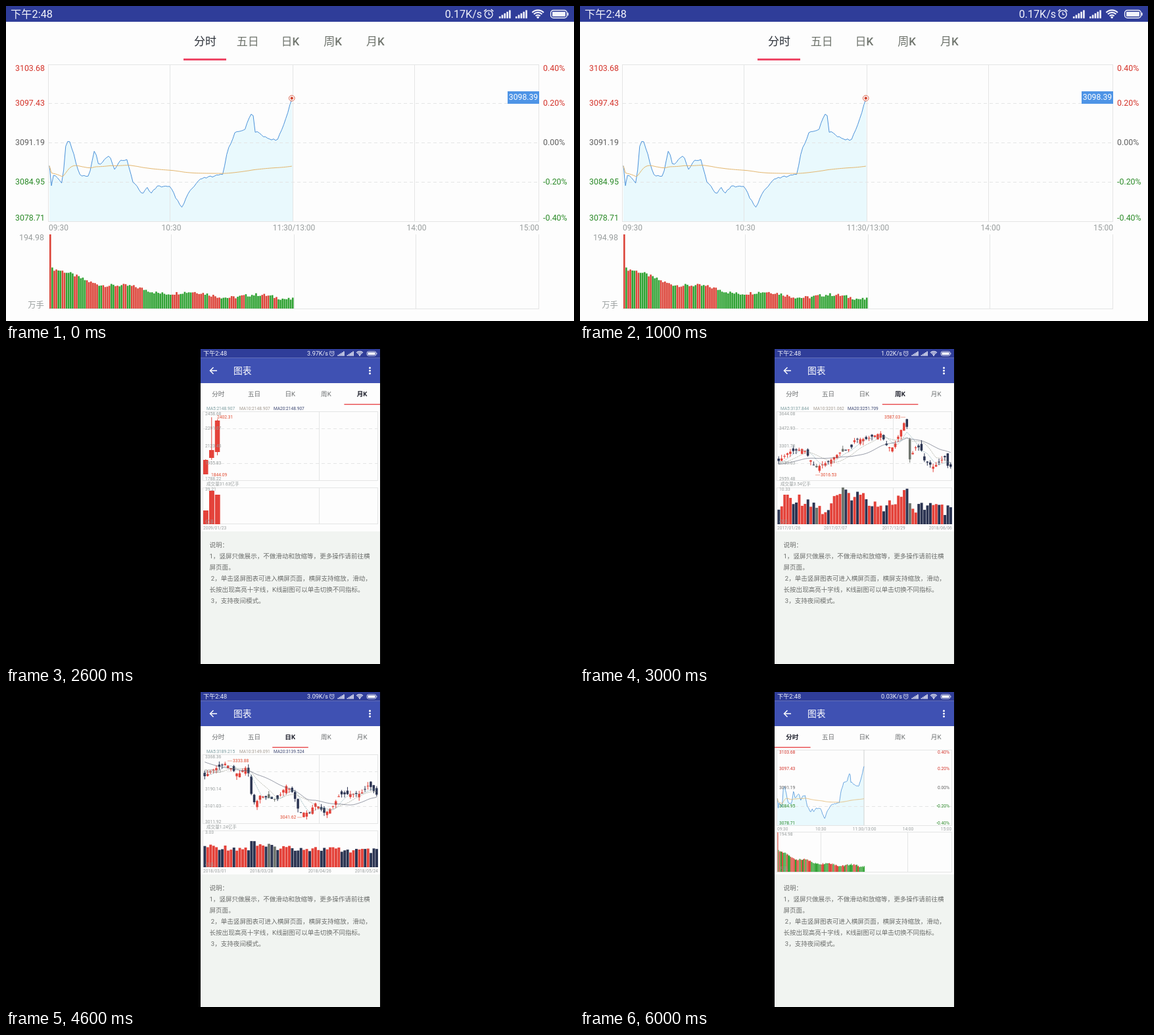
Write an HTML page with a canvas that moves like this. It is 864x480 px and loops after 7000 ms.

```html
<!DOCTYPE html>
<html lang="zh">
<head>
<meta charset="utf-8">
<style>
html, body { margin: 0; width: 100%; height: 100%; overflow: hidden; background: #000; }
canvas { display: block; }
</style>
</head>
<body>
<canvas id="stage" width="864" height="480"></canvas>
<script>
const ctx = document.getElementById('stage').getContext('2d');
const RED = '#dc4439', GREEN = '#2fa232', GRAY = '#999e9e', GRID = '#e4e5e5', DARK = '#2b3452';
const UP_TEXT = '#d4342b', FLAT_TEXT = '#606060', DOWN_TEXT = '#2b8a28';
const AXIS_COLORS = [UP_TEXT, UP_TEXT, FLAT_TEXT, DOWN_TEXT, DOWN_TEXT];
const TABS = ['分时', '五日', '日K', '周K', '月K'];

function noise(n) {
  const s = Math.sin(n * 12.9898) * 43758.5453;
  return s - Math.floor(s);
}

const jitter = (n, size) => (noise(n) - 0.5) * size;
const series = (count, rule) => Array.from({ length: count }, (_, i) => rule(i));

// Linear interpolation through key points written as 'x,y x,y ...'
function path(keys) {
  const points = keys.split(' ').map(p => p.split(',').map(Number));
  return x => {
    const next = points.findIndex(p => p[0] >= x);
    if (next < 1) return (next ? points[points.length - 1] : points[0])[1];
    const [x0, y0] = points[next - 1], [x1, y1] = points[next];
    return y0 + (y1 - y0) * (x - x0) / (x1 - x0);
  };
}

// One trading morning: a price and a volume per minute, in landscape pixels
const dayPath = path('66,245 69,273 73,256 86,271 91,212 96,202 112,257 126,260 135,217 141,244 158,227 ' +
  '165,250 175,234 184,234 193,267 208,287 214,276 220,287 230,274 250,276 267,309 278,284 297,263 330,257 ' +
  '337,220 349,192 363,188 375,160 379,191 397,201 413,205 424,177 435,140');
const minuteX = i => 66 + i * 3.1;
const dayPrice = series(120, i => dayPath(minuteX(i)) + jitter(i, 3));
const dayVolume = series(120, i => i ? 15 + 46 * Math.exp(-i / 38) + 3 * Math.sin(i / 5) + jitter(i, 5) : 113);
let turnover = 0, traded = 0;
const dayAverage = dayPrice.map((y, i) => (turnover += y * dayVolume[i]) / (traded += dayVolume[i]));

// Five sessions, one value per pixel
const fivePath = path('300,180 308,168 317,187 335,171 349,193 357,175 365,183 375,169 404,160 407,172 ' +
  '421,157 433,172 449,181 455,178 462,160 470,168 498,162 524,168 538,162');
const fivePrice = series(239, i => fivePath(300 + i) + jitter(i, 4));
let smooth = 178;
const fiveAverage = fivePrice.map(y => smooth += (y - smooth) * 0.035);
const openings = [[0, 60, 1], [2, 14, 9], [53, 44, 3], [106, 26, 5], [161, 13, 9], [213, 28, 4]];
const fiveVolume = series(240, i => openings.reduce(
  (h, [at, size, decay]) => h + (i < at ? 0 : size * Math.exp((at - i) / decay)),
  4 + noise(i) * 4 + (noise(i + 7) > 0.97 ? 9 : 0)));

const monthly = {
  tab: 4, averages: ['2148.907', '2148.907', '2148.907'],
  axis: ['2458.68', '2291.07', '2123.45', '1955.83', '1788.22'],
  dates: ['2009/01/23'], volume: '31.63', maxVolume: '39.21',
  high: ['2402.31', 321, 104], low: ['1844.09', 312, 192]
};
const weekly = {
  tab: 3, averages: ['3137.844', '3201.062', '3251.709'],
  axis: ['3644.08', '3472.93', '3301.78', '3130.63', '2959.48'],
  dates: ['2017/01/26', '2017/07/07', '2017/12/29', '2018/06/06'], volume: '3.54', maxVolume: '10.33',
  high: ['3587.03', 463, 104, 488, 495], low: ['3016.53', 366, 192, 358, 365], count: 60, volumeNoise: 20,
  close: path('296,176 318,157 340,152 358,181 378,172 395,158 412,152 418,138 436,137 457,128 468,150 ' +
    '477,150 495,108 498,122 500,172 510,150 518,150 524,170 538,180 557,163 560,182 566,178'),
  volumeTop: path('300,250 313,225 350,231 372,249 395,221 420,221 465,240 493,222 499,220 504,255 515,235 566,250')
};
const daily = {
  tab: 2, averages: ['3189.215', '3149.091', '3139.524'],
  axis: ['3368.36', '3279.25', '3190.14', '3101.03', '3011.92'],
  dates: ['2018/03/01', '2018/03/28', '2018/04/26', '2018/05/24'], volume: '1.24', maxVolume: '3.03',
  high: ['3333.88', 345, 105, 337, 344], low: ['3041.62', 417, 191, 443, 450], count: 60, volumeNoise: 9,
  close: path('240,92 300,130 314,119 334,109 353,126 365,115 371,129 372,152 379,172 386,158 412,165 ' +
    '426,143 437,154 446,184 462,184 470,169 485,185 496,176 508,156 540,155 552,141 565,158'),
  volumeTop: path('300,235 371,239 375,216 380,235 566,243')
};

function rect(x, y, w, h, color) {
  ctx.fillStyle = color;
  ctx.fillRect(x, y, w, h);
}

function text(s, x, y, size, color, align = 'left', weight = 400) {
  ctx.font = `${weight} ${size}px Roboto, "Noto Sans CJK SC", "Noto Sans CJK", sans-serif`;
  ctx.textAlign = align;
  ctx.textBaseline = 'middle';
  ctx.fillStyle = color;
  ctx.fillText(s, x, y);
}

function line(points, color, width = 1, dash = []) {
  ctx.beginPath();
  points.forEach(p => ctx.lineTo(...p));
  ctx.strokeStyle = color;
  ctx.lineWidth = width;
  ctx.setLineDash(dash);
  ctx.stroke();
  ctx.setLineDash([]);
}

function circle(x, y, r, fill, stroke, width = 1) {
  ctx.beginPath();
  ctx.arc(x, y, r, 0, 7);
  if (fill) { ctx.fillStyle = fill; ctx.fill(); }
  if (stroke) { ctx.strokeStyle = stroke; ctx.lineWidth = width; ctx.stroke(); }
}

function frame(x, y, w, h) {
  ctx.strokeStyle = GRID;
  ctx.lineWidth = 1;
  ctx.strokeRect(x, y, w, h);
}

const vertical = (x, y1, y2, color = GRID) => line([[x, y1], [x, y2]], color);
const dashed = (x1, x2, y) => line([[x1, y], [x2, y]], GRID, 1, [5, 4]);

function area(points, bottom, right) {
  ctx.beginPath();
  ctx.moveTo(points[0][0], bottom);
  points.forEach(p => ctx.lineTo(...p));
  ctx.lineTo(right, bottom);
  ctx.fillStyle = '#e9f9fd';
  ctx.fill();
}

function statusBar(left, right, scale, speed) {
  const white = '#f2f3fb', end = (right - left) / scale;
  ctx.save();
  ctx.translate(left, 0);
  ctx.scale(scale, scale);
  rect(0, 0, end, 13.6, '#2f3d99');
  text('下午2:48', 4, 7.2, 9.2, white);
  text(speed + 'K/s', end - 79, 7.2, 9.1, white, 'right');
  const clock = end - 73.3;
  circle(clock, 7.2, 3.3, null, white, 0.8);
  line([[clock, 5.3], [clock, 7.4], [clock + 1.5, 7.4]], white, 0.7);
  for (const side of [-1, 1]) line([[clock + side * 4, 4.6], [clock + side * 2, 2.9]], white, 0.8);
  for (const x of [end - 64.5, end - 50.3])
    for (let i = 0; i < 5; i++) rect(x + i * 2.15, 9 - i * 1.35, 1.5, 1.6 + i * 1.35, white);
  const wifi = end - 31;
  for (const r of [2.8, 5, 7]) {
    ctx.beginPath();
    ctx.arc(wifi, 10.6, r, -2.35, -0.79);
    ctx.lineWidth = 1.2;
    ctx.strokeStyle = white;
    ctx.stroke();
  }
  circle(wifi, 9.8, 1, white);
  ctx.beginPath();
  ctx.roundRect(end - 20, 3.7, 14, 6.6, 2.4);
  ctx.lineWidth = 0.8;
  ctx.stroke();
  rect(end - 18.6, 5, 11.2, 4, white);
  rect(end - 5.5, 5.8, 0.8, 2.4, white);
  ctx.restore();
}

// Shades the day's price area and returns a function that strokes its lines
function dayCurve(mapX, mapY, bottom, right, width) {
  const place = values => values.map((y, i) => [mapX(minuteX(i)), mapY(y)]);
  area(place(dayPrice), bottom, right);
  return () => {
    line(place(dayPrice), '#4b92da', width);
    line(place(dayAverage), '#e3b56b', width);
  };
}

function dayBars(mapX, bottom, scale, width) {
  dayVolume.forEach((h, i) => rect(mapX(minuteX(i)), bottom - h * scale, width, h * scale,
    !i || noise(i >> 1) > 0.5 ? RED : GREEN));
}

const dayAxis = ['3103.68', '3097.43', '3091.19', '3084.95', '3078.71'];
const dayPercent = ['0.40%', '0.20%', '0.00%', '-0.20%', '-0.40%'];
const fiveAxis = ['3215.04', '3167.75', '3120.46', '3073.17', '3025.88'];
const fivePercent = ['3.03%', '1.52%', '0.00%', '-1.52%', '-3.03%'];

// Labels spread over a width; the outer ones stay inside it
function spread(labels, left, step, y, size, last) {
  labels.forEach((s, i) => text(s, left + i * step, y, size, GRAY, !i ? 'left' : i === last ? 'right' : 'center'));
}

const hourLabels = (left, step, y, size) =>
  spread(['09:30', '10:30', '11:30/13:00', '14:00', '15:00'], left, step, y, size, 4);

function landscape() {
  rect(0, 0, 864, 480, '#fdfdfd');
  statusBar(0, 864, 1.77, '0.17');
  TABS.forEach((s, i) => text(s, 303 + i * 64.7, 54.5, 17, i ? '#70756e' : '#2b3038', 'center', 500));
  rect(270, 80, 65, 3, '#ee4766');

  const drawCurve = dayCurve(x => x, y => y, 329, 437, 1);
  frame(64.5, 89.5, 746, 239);
  [249.5, 436.5, 621.5].forEach(x => vertical(x, 90, 329));
  [148.5, 208.5, 268.5].forEach(y => dashed(65, 811, y));
  drawCurve();
  circle(434.8, 140.5, 4.3, '#fff', '#d9624c');
  circle(434.8, 140.5, 2.2, '#d2452f');
  rect(763, 130, 48, 19, '#4e94e6');
  text('3098.39', 787, 139.5, 12.2, '#fff', 'center');

  [95, 148.5, 208.5, 268.5, 323.5].forEach((y, i) => {
    text(dayAxis[i], 59, y, 12.4, AXIS_COLORS[i], 'right');
    text(dayPercent[i], 817, y, 12.4, AXIS_COLORS[i]);
  });
  hourLabels(65, 186.5, 338.5, 12);

  [251.5, 438.5, 623.5, 810.5].forEach(x => vertical(x, 348, 461));
  line([[65, 461.5], [811, 461.5]], GRID);
  dayBars(x => x, 461, 1, 2.6);
  text('194.98', 58, 353, 12.4, GRAY, 'right');
  text('万手', 58, 456, 12.4, GRAY, 'right');
}

function portrait(tab, speed) {
  rect(0, 0, 864, 480, '#000');
  rect(296, 0, 273, 480, '#f1f4f1');
  rect(296, 52, 273, 226, '#fdfdfd');
  statusBar(296, 569, 1, speed);
  rect(296, 13.6, 273, 38.4, '#3f51b3');
  line([[321, 33], [310.5, 33]], '#fff', 1.5);
  line([[315.5, 28], [310.5, 33], [315.5, 38]], '#fff', 1.5);
  text('图表', 346, 33.5, 13.8, '#fff');
  [28.7, 33, 37.3].forEach(y => circle(553.5, y, 1.5, '#fff'));
  TABS.forEach((s, i) => text(s, 322.8 + i * 54.7, 69.3, 9.6, i === tab ? '#20222e' : '#6c6f70', 'center', i === tab ? 700 : 400));
  rect(296 + tab * 54.6, 83.7, 54.6, 1.4, '#e8474a');
  ['说明：',
    '1，竖屏只做展示，不做滑动和放缩等，更多操作请前往横',
    '屏页面。',
    ' 2，单击竖屏图表可进入横屏页面，横屏支持缩放，滑动，',
    '长按出现高亮十字线，K线副图可以单击切换不同指标。',
    ' 3，支持夜间模式。'
  ].forEach((s, i) => text(s, 309.5, 299 + i * 17, 9.55, '#6b6d6b'));
}

function timeAxes(axis, percent, maxVolume) {
  [92, 117.2, 145.7, 174.3, 200.2].forEach((y, i) => {
    text(axis[i], 303, y, 6.7, AXIS_COLORS[i]);
    text(percent[i], 562, y, 6.7, AXIS_COLORS[i], 'right');
  });
  text(maxVolume, 303, 216.7, 6.7, GRAY);
  text('万手', 303, 270, 6.7, GRAY);
}

function timeFrames(priceLines, volumeLines) {
  frame(299.5, 88.5, 266, 115);
  frame(299.5, 213.5, 266, 61);
  dashed(300, 566, 174.5);
  priceLines.forEach(x => vertical(x, 88, 203));
  volumeLines.forEach(x => vertical(x, 213, 274));
}

function dayChart() {
  const mapX = x => 300 + (x - 65) * 0.3566;
  const mapY = y => 88.5 + (y - 90) * 0.481;
  const drawCurve = dayCurve(mapX, mapY, 203, 432, 0.8);
  timeFrames([], [366.5, 498.5]);
  vertical(432, 88, 203, '#cfd3d3');
  drawCurve();
  dayBars(mapX, 274, 0.532, 1.1);
  timeAxes(dayAxis, dayPercent, '194.98');
  hourLabels(300, 66.3, 208.7, 6.6);
}

function fiveDayChart() {
  const place = values => values.map((y, i) => [300 + i, y]);
  area(place(fivePrice), 203, 538);
  timeFrames([404.5, 458.5], [351.5, 512.5]);
  line(place(fivePrice), '#5583ad', 0.7);
  line(place(fiveAverage), '#ddb588', 0.8);
  fiveVolume.forEach((h, i) => rect(300 + i, 274 - h, 1, h, h > 24 || noise(i * 3 + 1) > 0.5 ? RED : GREEN));
  timeAxes(fiveAxis, fivePercent, '398.94');
  ['05-30', '05-31', '06-01', '06-04', '06-05'].forEach((s, i) =>
    text(s, 325 + i * 53.2, 208.7, 6.6, GRAY, 'center'));
}

function candle(x, w, open, close, high, low, volumeTop, fallColor = DARK) {
  const color = close <= open ? '#e4423a' : fallColor;
  rect(x + w / 2 - 0.5, high, 1, low - high, color);
  rect(x, Math.min(open, close), w, Math.max(1, Math.abs(open - close)), color);
  rect(x, volumeTop, w + 0.4, 267 - volumeTop, color);
}

function candles({ close, volumeTop, volumeNoise, count }) {
  const pitch = 266 / count, center = i => 300 + (i + 0.5) * pitch;
  for (let i = 0; i < count; i++) {
    const x = center(i), end = close(x);
    const open = close(x - pitch * 0.7) + jitter(i + 2, 14);
    const high = Math.min(open, end) - noise(i + 40) * 6;
    const low = Math.max(open, end) + noise(i + 90) * 6;
    candle(x - pitch * 0.4, pitch * 0.8, open, end, high, low,
      volumeTop(x) + jitter(i + 5, volumeNoise), noise(i + 17) > 0.7 ? '#70766f' : DARK);
  }
  [[5, '#6f9da3'], [10, '#8d9080'], [20, '#555b70']].forEach(([span, color]) =>
    line(series(count, i => {
      const recent = series(span, k => close(center(i - k)));
      return [center(i), recent.reduce((a, b) => a + b) / span];
    }), color, 0.6, span < 20 ? [2, 1] : []));
}

function candleChart(k) {
  ['MA5:', 'MA10:', 'MA20:'].forEach((s, i) =>
    text(s + k.averages[i], [305, 355, 407][i], 91.2, 6.6, ['#7c9da0', '#a39a90', '#3d4873'][i]));
  frame(299.5, 95.5, 266, 105);
  [121.5, 174.5].forEach(y => dashed(300, 566, y));
  frame(299.5, 211.5, 266, 55);
  vertical(476.5, 96, 200);
  vertical(476.5, 211, 267);
  if (k.count) {
    candles(k);
  } else {
    candle(300, 7.5, 191, 169, 168, 191, 246);
    candle(309, 7.5, 166, 154, 104, 169, 216);
    candle(317.8, 7.5, 157, 109, 107, 162, 222);
  }
  [99, 121.5, 148, 174.3, 197.7].forEach((y, i) => text(k.axis[i], 303, y, 6.7, GRAY));
  for (const [s, x, y, from, to] of [k.high, k.low]) {
    text(s, x, y, 6.7, '#e0492f');
    if (from) line([[from, y], [to, y]], '#e0492f', 0.5);
  }
  text(`成交量${k.volume}亿手`, 305, 206.5, 6.6, GRAY);
  text(k.maxVolume, 303, 214, 6.7, GRAY);
  text('亿手', 303, 264, 6.7, GRAY);
  spread(k.dates, 300, 88.6, 273.3, 6.6, 3);
}

function showCandles(k, speed) {
  portrait(k.tab, speed);
  candleChart(k);
}

const scenes = [
  landscape,
  landscape,
  () => showCandles(monthly, '3.97'),
  () => showCandles(weekly, '1.02'),
  () => showCandles(daily, '3.09'),
  () => { portrait(1, '0.03'); fiveDayChart(); },
  () => { portrait(0, '0.03'); dayChart(); }
];

function draw() {
  scenes[Math.floor(performance.now() / 1000) % scenes.length]();
  requestAnimationFrame(draw);
}
draw();
</script>
</body>
</html>
```
